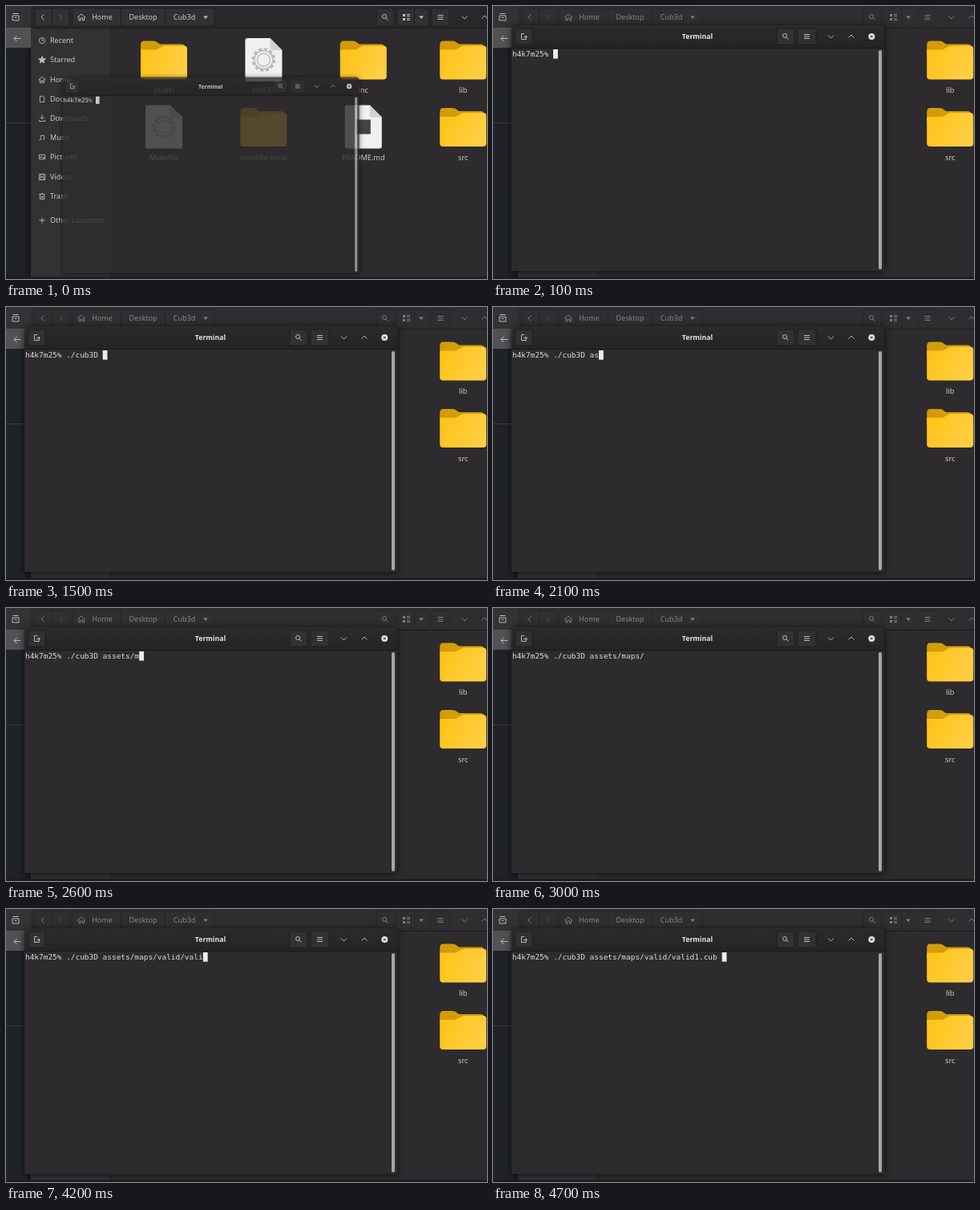
Recreate the animation shown at these times as an HTML page. Size 600 by 340 pixels, loop 5 s.

```html
<!DOCTYPE html>
<html lang="en">
<head>
<meta charset="utf-8">
<title>Terminal</title>
<style>
html, body { margin: 0; width: 100%; height: 100%; overflow: hidden; background: #2d2b2d; }
svg { display: block; width: 600px; height: 340px; font: 9px "Noto Sans", "Open Sans", sans-serif; }
text { fill: #cdcbcd; }
.mid { text-anchor: middle; }
.label { font-size: 9.2px; }
.line { fill: none; stroke: #c2c0c2; stroke-width: .95; }
.solid { fill: #c2c0c2; }
.button { fill: #313032; stroke: #1d1c1e; stroke-width: .8; }
.title { font-weight: bold; font-size: 8.7px; fill: #e6e4e6; }
.prompt { font: 9.45px "DejaVu Sans Mono", monospace; white-space: pre; fill: #dddbdd; }
#term { filter: drop-shadow(0 1px 4px #000a); }
</style>
</head>
<body>
<svg viewBox="0 0 600 340">
  <defs>
    <linearGradient id="gold" x2="1" y2=".4">
      <stop stop-color="#ffc212"/><stop offset="1" stop-color="#ffce42"/>
    </linearGradient>
    <linearGradient id="bar" x2="0" y2="1">
      <stop stop-color="#2b2a2c"/><stop offset="1" stop-color="#242325"/>
    </linearGradient>
    <linearGradient id="shade">
      <stop stop-color="#000" stop-opacity="0"/><stop offset="1" stop-color="#000" stop-opacity=".3"/>
    </linearGradient>
    <g id="folder">
      <path fill="#d39c0a" d="M0 6Q0 1 4 1H16Q19 1 21 3L24 5H51Q55 5 55 9V20H0Z"/>
      <path fill="url(#gold)" d="M0 12H18Q21 12 23 10L26 8.500Q28 7 30 7H54Q58 7 58 11V45Q58 49 54 49H4Q0 49 0 45Z"/>
    </g>
    <g id="page">
      <path fill="#f1f0f1" d="M-23-24Q-23-27-20-27H8L23-12V24Q23 27 20 27H-20Q-23 27-23 24Z"/>
      <path fill="#d2d0d2" d="M8-27V-15Q8-12 11-12H23Z"/>
    </g>
    <g id="gear" fill="none" stroke="#b9b7b9">
      <circle r="13.500" stroke-width="2.600" stroke-dasharray="4.240 2.828"/>
      <circle r="11.500" stroke-width="1.500"/>
      <circle r="8" stroke-width="1.300"/>
    </g>
    <g id="search" class="line"><circle cx="-1" cy="-1" r="2.500"/><path d="M1 1L3.500 3.500"/></g>
    <path id="menu" class="line" d="M-3.500-2.500H3.500M-3.500 0H3.500M-3.500 2.500H3.500"/>
    <path id="down" class="line" d="M-3.500-1.500L0 2L3.500-1.500"/>
    <path id="up" class="line" d="M-3.500 1.500L0-2L3.500 1.500"/>
    <path id="caret" class="solid" d="M-3-1.500H3L0 2Z"/>
  </defs>

  <rect x="31" width="99" height="340" fill="#333134"/>
  <rect x="130" width="470" height="340" fill="#2d2b2d"/>
  <path stroke="#262427" d="M130.500 28V340"/>
  <g id="places"></g>
  <g id="files"></g>

  <rect id="header" x="31" width="569" height="28" fill="#29272a"/>
  <path stroke="#1c1b1d" d="M31 27.500H600"/>
  <g id="tools">
    <path class="button" d="M36 3H79V25H36ZM83 3H260V25H83ZM462 3H484V25H462ZM488 3H527V25H488ZM531 3H553V25H531Z"/>
    <path stroke="#1d1c1e" d="M57.500 3V25M143.500 3V25M198.500 3V25M509.500 3V25"/>
    <path class="line" d="M47.500 10.500L44 14L47.500 17.500"/>
    <path class="line" opacity=".4" d="M66.500 10.500L70 14L66.500 17.500"/>
    <path class="line" d="M89 14.500L94 10L99 14.500M91 13.500V18H93V15H95.500V18H97.500V13.500"/>
    <text class="mid" x="120" y="17.300">Home</text>
    <text class="mid" x="171" y="17.300">Desktop</text>
    <text class="mid" x="222.500" y="17.300">Cub3d</text>
    <use href="#caret" x="249" y="14"/>
    <use href="#search" x="473" y="14"/>
    <path class="solid" d="M495 10H498V13H495ZM495 15H498V18H495ZM500 10H504V11H500ZM500 12H504V13H500ZM500 15H504V16H500ZM500 17H504V18H500Z"/>
    <use href="#caret" x="518" y="14"/>
    <use href="#menu" x="542" y="14"/>
    <use href="#down" x="572" y="14"/>
    <use href="#up" x="597" y="14"/>
  </g>

  <rect width="31" height="340" fill="#1f2226"/>
  <rect width="31" height="27" fill="#333335"/>
  <rect width="31" height="25" y="27" fill="#525153"/>
  <path stroke="#393b3f" d="M0 145.500H31"/>
  <rect x="22" y="52" width="9" height="288" fill="url(#shade)"/>
  <path class="line" d="M8 12H16V18H8ZM8.500 9.500H15.500M10.500 14.500H13.500"/>
  <path class="line" d="M18.500 40.500H10M13.500 37L10 40.500L13.500 44"/>
  <rect y="337.500" width="600" height="2.500" fill="#211a20"/>

  <g id="term">
    <path fill="#2d2b2d" d="M23 330V30Q23 24 29 24H482Q488 24 488 30V330Z"/>
    <path fill="url(#bar)" d="M23 53V30Q23 24 29 24H482Q488 24 488 30V53Z"/>
    <path stroke="#19181a" d="M23 52.500H488"/>
    <path class="button" d="M28 28H49V48H28ZM354 28H376V48H354ZM380 28H403V48H380Z"/>
    <path class="line" d="M39 34.500H35.500V41.500H41.500V40.500M38 38.500H42.500M40.500 36.500L42.500 38.500L40.500 40.500"/>
    <text class="mid title" x="255" y="41.300">Terminal</text>
    <use href="#search" x="365" y="38"/>
    <use href="#menu" x="391.500" y="38"/>
    <use href="#down" x="421.500" y="38"/>
    <use href="#up" x="447" y="38"/>
    <circle cx="472.300" cy="38" r="4" fill="#e6e4e6"/>
    <path stroke="#262427" d="M470.800 36.500L473.800 39.500M473.800 36.500L470.800 39.500"/>
    <rect x="481" y="55" width="4" height="273" rx="2" fill="#a7a5a7"/>
    <text id="line" class="prompt" x="24" y="63"></text>
    <rect id="cursor" y="54" width="5.800" height="11.600" fill="#eeecee"/>
  </g>
</svg>
<script>
const $ = id => document.getElementById(id);

// Sidebar entries: label, row centre, icon path around (0, 0)
const places = [
  ["Recent", 43, "M-4 0A4 4 0 1 0 4 0A4 4 0 1 0-4 0M0-2.500V0H2"],
  ["Starred", 67, "M0-5L1.300-1.500L5-1.300L2 1L3 4.500L0 2.500L-3 4.500L-2 1L-5-1.300L-1.300-1.500Z"],
  ["Home", 92, "M-5 0L0-4L5 0M-3-1V4H-1V1H1V4H3V-1"],
  ["Documents", 116, "M-3-4H1L3-2V4H-3Z"],
  ["Downloads", 140, "M0-5V1M-3-2L0 1L3-2M-4 2V4H4V2"],
  ["Music", 164, "M-2 3V-3H3V2M-4 3H-2M1 2H3"],
  ["Pictures", 188, "M-4-3H4V3H-4ZM-3 2L-1-1L1 1L2 0L3 2"],
  ["Videos", 213, "M-4-4H4V4H-4ZM-2-4V4M2-4V4M-2 0H2"],
  ["Trash", 237, "M-4-3H4M-3-3V4H3V-3M-1-4H1M-1 0H1V2H-1Z"],
  ["Other Locations", 267, "M-4 0H4M0-4V4"]
];
$("places").innerHTML = places.map(([name, y, icon]) =>
  `<path class="line${name == "Starred" ? " solid" : ""}" style="${name == "Starred" ? "fill:#c2c0c2" : ""}"
    transform="translate(45 ${y}) scale(.9)" d="${icon}"/><text x="55" y="${y + 3.3}">${name}</text>`).join("");

const names = ["assets", "cub3D", "inc", "lib", "Makefile", "minilibx-linux", "README.md", "src"];
const pages = {
  cub3D: '<use href="#gear"/>',
  Makefile: '<use href="#gear"/>',
  "README.md": '<rect x="-9" y="-9" width="18" height="18" fill="#454345"/>'
};
$("files").innerHTML = names.map((name, i) => {
  const x = 197 + i % 4 * 124.4, y = 67 + (i > 3) * 83.5;
  const icon = name in pages ? '<use href="#page"/>' + pages[name] : '<use href="#folder" x="-29" y="-24.500"/>';
  return `<g transform="translate(${x} ${y})">${icon}<text class="mid label" y="41.300">${name}</text></g>`;
}).join("");

const prompt = "h4k7m25% ", command = "./cub3D assets/maps/valid/valid1.cub ";
// [time in ms, characters typed]; jumps are tab completions
const keys = [
  [700, 1], [900, 2], [1100, 3], [1300, 4], [1400, 5], [1500, 8],
  [2000, 9], [2100, 10], [2200, 11], [2300, 15],
  [2500, 16], [2700, 17], [2800, 20],
  [3400, 21], [3500, 22], [3600, 26],
  [3900, 27], [4000, 28], [4100, 29], [4200, 30], [4300, 31], [4500, 32], [4700, 37]
];
const blinks = [[400, 700], [1800, 2000], [3000, 3400]];
const start = performance.now();

function draw(now) {
  const t = Math.max(0, now - start) % 5000;
  const opening = t < 100;
  const typed = keys.reduce((n, [at, count]) => t >= at ? count : n, 0);

  $("term").setAttribute("transform", opening ? "translate(52.200 69.700) scale(.796)" : "");
  $("term").setAttribute("opacity", opening ? .81 : 1);
  $("tools").setAttribute("opacity", opening ? 1 : .55);
  $("header").setAttribute("fill", opening ? "#29272a" : "#2f2d30");

  $("line").textContent = prompt + command.slice(0, typed);
  $("cursor").setAttribute("x", 23.9 + 5.69 * (prompt.length + typed));
  const hidden = blinks.some(([from, to]) => t >= from && t < to);
  $("cursor").setAttribute("visibility", hidden ? "hidden" : "visible");
  requestAnimationFrame(draw);
}
draw(start);
</script>
</body>
</html>
```
